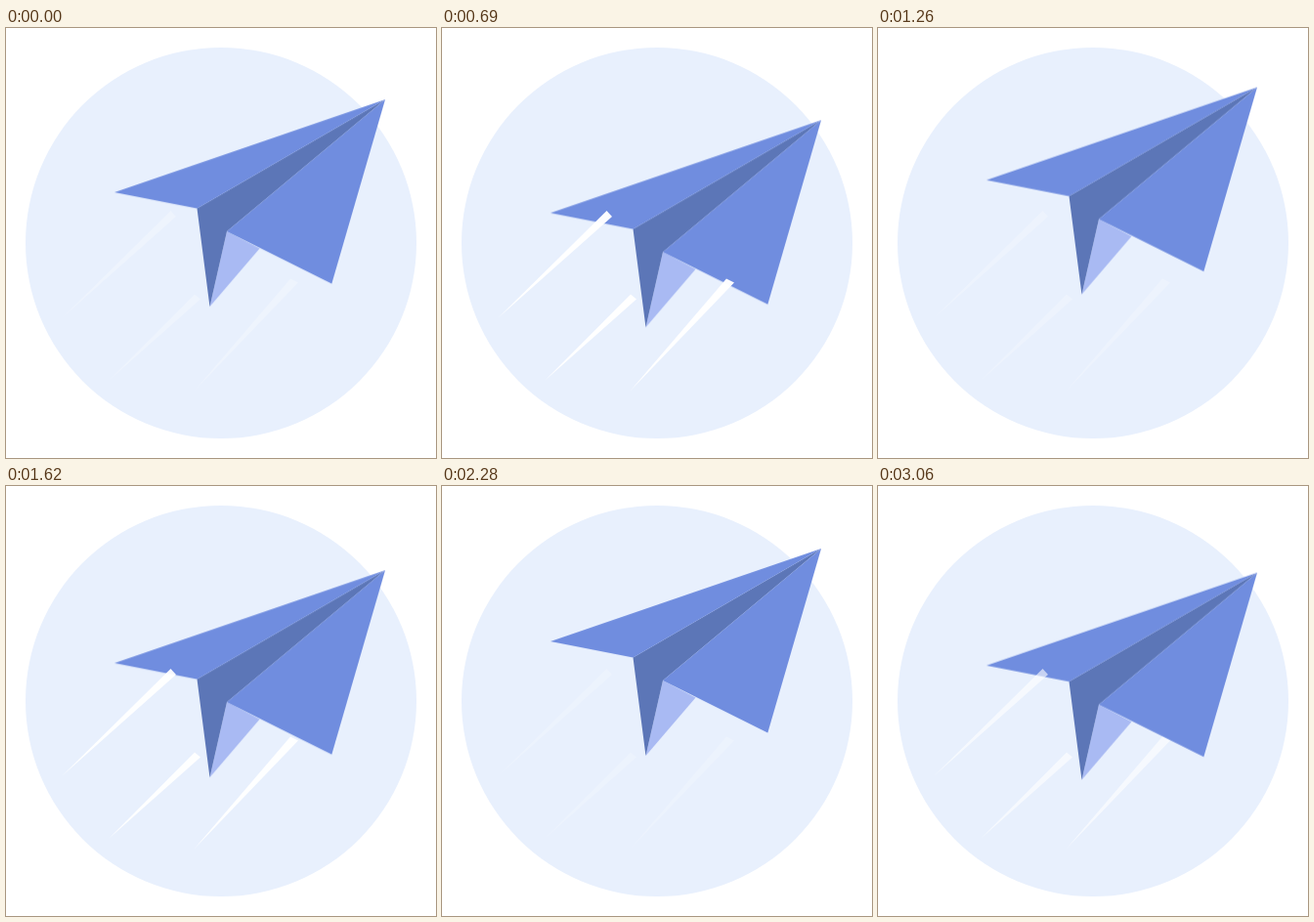
Recreate the animation shown at these times as an HTML page. Size 440 px wide and 440 px high, loop 3.09 s.

```html
<!DOCTYPE html>
<html lang="en">
<head>
<meta charset="utf-8">
<title>Paper plane</title>
<style>
  html, body { margin: 0; width: 100%; height: 100%; overflow: hidden; background: #fff; }
  svg { display: block; width: 100vw; height: 100vh; }
  /* Both cycles are paused and placed in time through --t. */
  .plane, .streaks { animation: 1080ms infinite paused; }
  .plane { animation-name: glide; animation-delay: calc(-300ms - var(--t, 0ms)); }
  .streaks { animation-name: glow; animation-delay: calc(-445ms - var(--t, 0ms)); }
  @keyframes glide {
    0% { transform: translateY(23px); animation-timing-function: cubic-bezier(.33, .2, .6, .8); }
    50% { transform: translateY(-15px); animation-timing-function: ease-out; }
    100% { transform: translateY(23px); }
  }
  @keyframes glow {
    0%, 100% { opacity: 1; animation-timing-function: cubic-bezier(.37, 0, .63, 1); }
    50% { opacity: .2; animation-timing-function: cubic-bezier(.37, 0, .63, 1); }
  }
</style>
</head>
<body>
<svg viewBox="0 0 440 440">
  <circle cx="220" cy="220" r="200" fill="#e8f0fd"/>
  <g class="plane">
    <path d="M226 208 259.5 225.5 208.5 285Z" fill="#a9baf3"/>
    <path d="M388 73 195.5 184.5 208.5 285 226 208Z" fill="#5c76b7"/>
    <path d="M388 73 111 168 195.5 184.5Z" fill="#708ddf"/>
    <path d="M388 73 226 208 333.3 261.5Z" fill="#708ddf"/>
  </g>
  <g class="streaks" fill="#fff">
    <path d="M57 297 168.5 187 174 193Z"/>
    <path d="M105 361 193 272.5 199 277.5Z"/>
    <path d="M192 372 291 256.5 299 260.5Z"/>
  </g>
</svg>
<script>
  const LOOP = 3090, STEP = 30;
  const root = document.documentElement;

  function draw() {
    const t = performance.now() % LOOP;
    root.style.setProperty('--t', Math.floor(t / STEP) * STEP + 'ms');
    requestAnimationFrame(draw);
  }
  draw();
</script>
</body>
</html>
```
